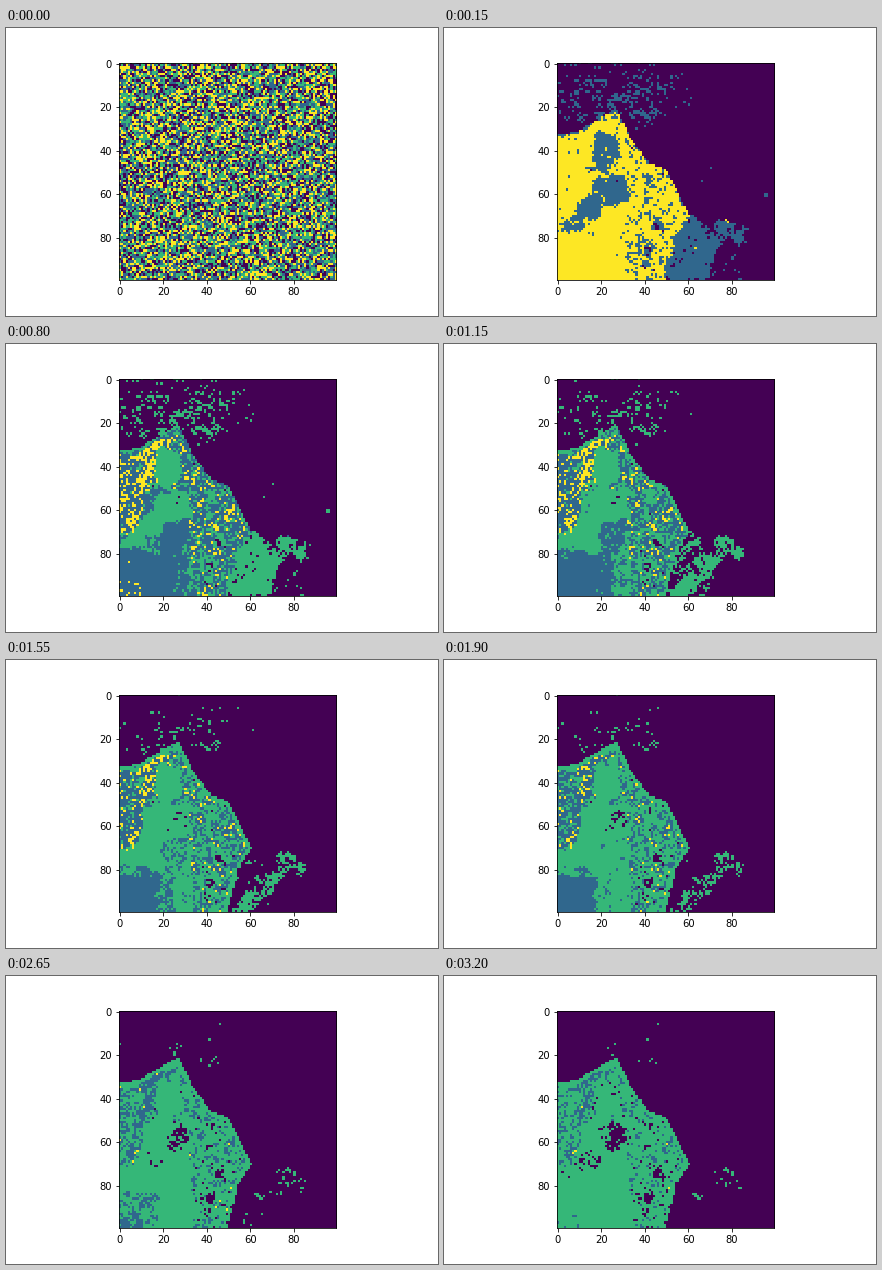
Recreate the animation shown at these times as a matplotlib script. Size 432 by 288 pixels, loop 3300 ms.

```python
import numpy as np
import matplotlib.pyplot as plt
from matplotlib.animation import FuncAnimation

N = 100
FRAMES = 66
rng = np.random.default_rng(11)
Y, X = np.mgrid[0:N, 0:N].astype(float)


def noise():
    return rng.standard_normal((N, N))


def soft(passes):
    """Unit-variance noise, blurred by repeated neighbour averaging."""
    a = noise()
    for _ in range(passes):
        for axis in (0, 1):
            a = (np.roll(a, 1, axis) + 2 * a + np.roll(a, -1, axis)) / 4
    return a / a.std()


def grain():
    return 0.8 * noise() + 0.6 * soft(2)


# Jittered coordinates give the inner regions ragged borders.
XJ = X + 0.7 * soft(6) + 0.4 * noise()
YJ = Y + 0.7 * soft(6) + 0.4 * noise()


def disc(cx, cy, rx, ry):
    return ((XJ - cx) / rx) ** 2 + ((YJ - cy) / ry) ** 2 < 1


def stroke(ax, ay, bx, by, width):
    dx, dy = bx - ax, by - ay
    t = np.clip(((XJ - ax) * dx + (YJ - ay) * dy) / (dx * dx + dy * dy), 0, 1)
    return np.hypot(XJ - ax - t * dx, YJ - ay - t * dy) < width


def glow(cx, cy, r):
    return np.exp(-((X - cx) ** 2 + (Y - cy) ** 2) / (r * r))


def erode(mask):
    pad = np.pad(mask, 1, mode="edge")
    return (mask & pad[:-2, 1:-1] & pad[2:, 1:-1]
            & pad[1:-1, :-2] & pad[1:-1, 2:])


def fill(u, mask, mean, spread):
    u[mask] = (mean + spread * grain())[mask]


def sky():
    haze = np.clip((70 - X) / 26, 0, 1) * np.clip((38 - Y) / 14, 0, 1)
    mean = 0.085 + 0.075 * haze + 0.05 * glow(30, 16, 8)
    mean += 0.07 * glow(68, 49, 10) + 0.05 * glow(42, 26, 6)
    u = mean + (0.045 + 0.037 * haze) * grain()
    u[60:62, 95:97] = 0.27
    return u


def foothill(u):
    top = np.interp(X, [59, 67, 75, 88], [66, 75, 71, 76])
    body = (Y > top) & (X > 48) & (X < 87.5)
    fill(u, body, 0.215, 0.018)
    fill(u, body & disc(60, 86, 13, 16), 0.265, 0.022)
    fill(u, body & stroke(55, 99, 71, 84, 3.8), 0.30, 0.032)
    fill(u, disc(76, 76.5, 4.5, 5), 0.34, 0.07)
    fill(u, disc(82.5, 80, 3, 3), 0.34, 0.07)
    fill(u, disc(62.5, 84.5, 1.4, 1.4), 0.48, 0.03)


def mountain(u):
    top = np.interp(X, [0, 8, 26], [32.5, 31.7, 21.5])
    right = np.interp(Y, [21, 34, 46, 49, 70, 80, 99],
                      [27, 33, 42, 50, 60.5, 54, 49.5])
    body = (Y > top) & (X < right)
    fill(u, body, 0.60, 0.13)
    gully = body & (abs(X - 44) < 5) & (Y > 70)
    u[gully] -= 0.11 * np.clip(soft(2), 0, 3)[gully]
    rim = body & ~erode(erode(body))
    fill(u, rim, 0.53, 0.06)

    # Smooth lower-left slope, brighter towards the bottom corner.
    slope = (YJ > 50) & (XJ < 32)
    fill(u, slope, 0.52, 0.025)
    fill(u, slope & (YJ > 62) & (XJ > 19), 0.59, 0.03)
    fill(u, slope & (YJ > 80) & (XJ > 25), 0.54, 0.035)
    fill(u, slope & (YJ > 79) & (XJ < 25), 0.61, 0.025)
    fill(u, slope & (YJ > 83) & (XJ < 17), 0.69, 0.018)
    fill(u, slope & (YJ > 93) & (XJ < 10), 0.71, 0.02)
    fill(u, stroke(31, 70, 32, 99, 1.5), 0.52, 0.06)

    # Dark patches and the hollow that opens late.
    fill(u, disc(21, 41, 7, 9.5), 0.445, 0.026)
    fill(u, disc(24, 59, 8, 7) | stroke(24, 57, 12, 68, 4), 0.44, 0.025)
    fill(u, disc(7, 74, 6, 4), 0.45, 0.03)
    fill(u, disc(15, 68, 5, 4), 0.42, 0.03)
    fill(u, disc(26.5, 57.5, 5.5, 6.5), 0.395, 0.04)
    fill(u, disc(28.5, 57, 2.5, 4), 0.33, 0.04)

    # Bright left face, with the crest above it.
    face = (YJ > 35) & (YJ < 69.5) & (XJ < 12 - 0.3 * np.clip(YJ - 53, 0, 17))
    fill(u, body & face, 0.73, 0.10)
    crest = stroke(12, 49, 15, 33, 1.2) | stroke(15, 32, 25, 27, 1.2)
    fill(u, body & crest, 0.77, 0.07)
    fill(u, body & ~erode(body), 0.48, 0.05)


light = sky()
foothill(light)
mountain(light)
start = rng.integers(0, 4, (N, N))

# Class borders: the middle class splits off, then all of them creep upwards.
FIRST = np.array([0.24, 0.24, 0.48])
SPLIT = np.array([0.18, 0.42, 0.72])
LAST = np.array([0.39, 0.74, 0.99])
EASE = np.array([0.6, 0.6, 1.4])
SPLIT_AT = 9
ORDER = np.array([0, 2, 1, 3])


def borders(i):
    if i < SPLIT_AT:
        b = FIRST + (SPLIT - FIRST) * (i - 3) / (SPLIT_AT - 3)
        b[1] = max(b[0], b[1])
        return b
    q = min((i - SPLIT_AT) / (FRAMES - 2 - SPLIT_AT), 1)
    return SPLIT + (LAST - SPLIT) * q ** EASE


def labels(i):
    if i == 0:
        return start
    return ORDER[(light[..., None] > borders(i)).sum(axis=-1)]


plt.rcParams["font.family"] = "DejaVu Sans"
fig, ax = plt.subplots(figsize=(6, 4), dpi=72, facecolor="white")
fig.subplots_adjust(left=0.125, right=0.9, bottom=0.125, top=0.88)
image = ax.imshow(start, cmap="viridis", vmin=0, vmax=3,
                  interpolation="nearest")
ax.set_xticks(range(0, N, 20))
ax.set_yticks(range(0, N, 20))


def draw(i):
    image.set_data(labels(i))
    return [image]


anim = FuncAnimation(fig, draw, frames=FRAMES, interval=50, repeat=True,
                     repeat_delay=0)
plt.show()
```
